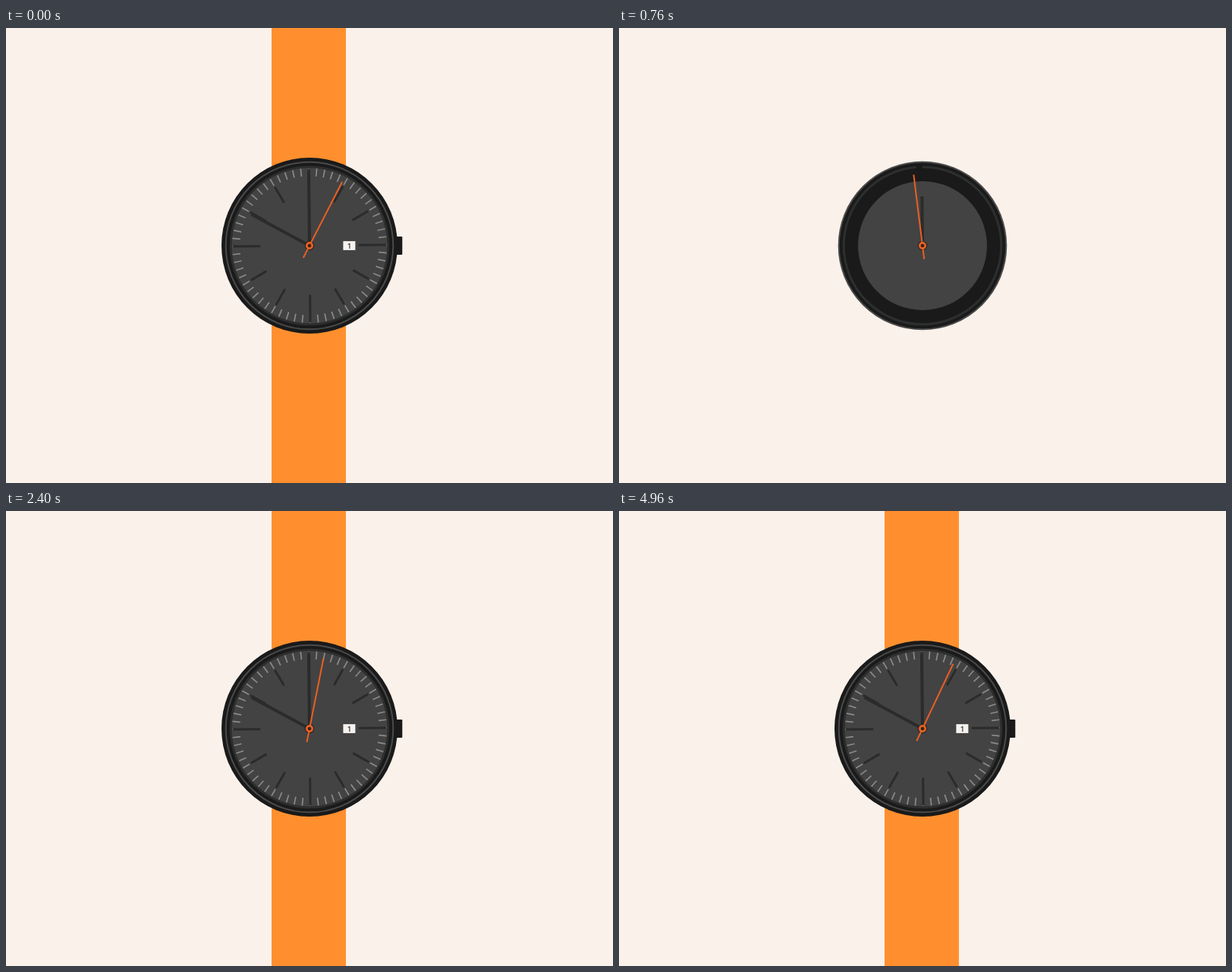
An HTML page with a canvas for the animation above (5 s loop, 800 by 600 pixels).

```html
<!DOCTYPE html>
<html lang="en">
<head>
<meta charset="utf-8">
<title>Watch</title>
<style>
  html, body { margin: 0; width: 100%; height: 100%; overflow: hidden; background: #faf1eb; }
  canvas { display: block; width: 800px; height: 600px; }
</style>
</head>
<body>
<canvas id="stage" width="800" height="600"></canvas>
<script>
const ctx = document.getElementById('stage').getContext('2d');
const LOOP = 5000, STEP = 40, TAU = Math.PI * 2;
const CX = 400, CY = 287, TILT = -0.6;
const color = {
  paper: '#faf1eb', strap: '#ff8f2e', body: '#1a1a1a', face: '#434343',
  mark: '#2b2b2b', tick: '#8c8a89', rim: '#4a4a4a', second: '#eb5f22'
};

const clamp = x => Math.min(1, Math.max(0, x));
const span = (t, a, b) => clamp((t - a) / (b - a));
const easeOut = x => 1 - (1 - x) ** 3;
const easeInOut = x => x * x * (3 - 2 * x);
const mix = (a, b, k) => a + (b - a) * k;

// Smooth interpolation through [time, value] pairs.
function track(t, keys) {
  if (t <= keys[0][0]) return keys[0][1];
  for (let i = 1; i < keys.length; i++) {
    const [t0, v0] = keys[i - 1], [t1, v1] = keys[i];
    if (t < t1) return mix(v0, v1, easeInOut((t - t0) / (t1 - t0)));
  }
  return keys[keys.length - 1][1];
}

function polar(degrees, r) {
  const a = degrees * Math.PI / 180;
  return [r * Math.sin(a), -r * Math.cos(a)];
}

function disc(r, fill) {
  if (r <= 0) return;
  ctx.fillStyle = fill;
  ctx.beginPath();
  ctx.arc(0, 0, r, 0, TAU);
  ctx.fill();
}

function ring(r, width, stroke, part = 1) {
  if (part <= 0) return;
  ctx.strokeStyle = stroke;
  ctx.lineWidth = width;
  ctx.beginPath();
  ctx.arc(0, 0, r, -TAU / 4, -TAU / 4 + TAU * part);
  ctx.stroke();
}

function spoke(angle, r0, r1, width, stroke, cap = 'butt') {
  if (Math.abs(r1 - r0) < 0.05) return;
  ctx.strokeStyle = stroke;
  ctx.lineWidth = width;
  ctx.lineCap = cap;
  ctx.beginPath();
  ctx.moveTo(...polar(angle, r0));
  ctx.lineTo(...polar(angle, r1));
  ctx.stroke();
  ctx.lineCap = 'butt';
}

function drawStrap(t) {
  const reach = 143 + 0.6 * (t - 1120);
  if (reach < 100) return;
  const top = Math.min(reach, CY);
  const bottom = Math.min(reach * 1.078, 600 - CY);
  ctx.fillStyle = color.strap;
  ctx.fillRect(-50, -top, 98, top + bottom);
}

function drawCrown(t) {
  if (t < 860) return;
  const right = track(t, [[860, 108], [1080, 132], [1220, 122.3]]);
  ctx.fillStyle = color.body;
  ctx.beginPath();
  ctx.roundRect(100, -12, right - 100, 24, 1);
  ctx.fill();
}

function drawCase(t) {
  disc(track(t, [[500, 0], [760, 110], [900, 116]]), color.body);
  ring(110.3, 2, color.rim, easeInOut(span(t, 110, 690)));
  ring(103.8, 3, '#2d2f2f', easeInOut(span(t, 480, 780)));
  disc(track(t, [[560, 0], [760, 85], [900, 102.5]]), color.face);
}

function drawDial(t) {
  const ticks = easeOut(span(t, 900, 1220));
  const marks = easeOut(span(t, 860, 1200));
  for (let i = 0; i < 60; i++) {
    spoke(i * 6 + TILT, 102, 102 - 10.3 * ticks, 1.7, color.tick);
  }
  for (let i = 0; i < 12; i++) {
    const outer = i % 3 ? 88.5 : 100;
    const inner = i % 3 ? 67 : 66;
    spoke(i * 30 + TILT, outer, mix(outer, inner, marks), 3, color.mark, 'round');
  }
}

function drawDate(t) {
  const size = track(t, [[960, 0], [1180, 1.1], [1320, 1]]);
  if (!size) return;
  ctx.save();
  ctx.translate(52.4, 0);
  ctx.scale(size, size);
  ctx.fillStyle = '#f6f2ef';
  ctx.fillRect(-8, -5.9, 16, 11.8);
  ctx.fillStyle = '#242424';
  ctx.font = '500 9.5px Inter, sans-serif';
  ctx.textAlign = 'center';
  ctx.textBaseline = 'alphabetic';
  ctx.fillText('1', -0.2, 3.6);
  ctx.restore();
}

// Underdamped step response: one small overshoot, then rest.
function spring(ms) {
  if (ms <= 0) return 0;
  const s = ms / 1000, k = 8.2, w = 11.6;
  return 1 - Math.exp(-k * s) * (Math.cos(w * s) + k / w * Math.sin(w * s));
}

function secondAngle(t) {
  let angle = track(t, [[40, -70], [360, 0], [520, 8], [760, -7.1], [910, -1.7]]);
  for (let n = 1; n <= 5; n++) angle += 6.5 * spring(t - n * 1000 + 85);
  return angle;
}

function drawSecond(t) {
  const grow = easeOut(span(t, 40, 320));
  const angle = secondAngle(t);
  const twist = 70 * (1 - easeInOut(span(t, 360, 640)));
  const at = r => polar(angle + twist * (1 - Math.abs(r) / 110) ** 2, r);

  ctx.strokeStyle = color.second;
  ctx.lineWidth = 2;
  ctx.lineJoin = 'round';
  ctx.beginPath();
  for (let r = -18; r <= 94.4; r += 2) ctx.lineTo(...at(r * grow));
  ctx.lineTo(...at(94.4 * grow));
  ctx.stroke();

  disc(5 * clamp(grow * 1.5), color.second);
  disc(2.3 * clamp(grow * 1.5), '#30231f');
}

function drawHands(t) {
  const minute = track(t, [[640, 0], [760, 65], [900, 98]]);
  const hour = 87 * easeOut(span(t, 780, 1060));
  spoke(TILT, 0, minute, 4, color.mark);
  spoke(-61.7, 0, hour, 4, color.mark);
  disc(6.3 * easeOut(span(t, 560, 720)), color.mark);
}

function draw(time) {
  const t = time < STEP ? time + LOOP : time;
  ctx.setTransform(1, 0, 0, 1, 0, 0);
  ctx.fillStyle = color.paper;
  ctx.fillRect(0, 0, 800, 600);
  ctx.translate(CX, CY);

  drawStrap(t);
  drawCrown(t);
  if (t > 240 && t < 760) {
    for (let i = 0; i < 60; i++) spoke(i * 6 + TILT, 104.8, 105.8, 1.7, '#ece3de');
  }
  drawCase(t);
  if (t > 860) drawDial(t);
  drawDate(t);
  drawHands(t);
  drawSecond(t);
}

let start;
function frame(now) {
  start ??= now;
  draw(Math.floor(((now - start) % LOOP) / STEP) * STEP);
  requestAnimationFrame(frame);
}
draw(0);
requestAnimationFrame(frame);
</script>
</body>
</html>
```
